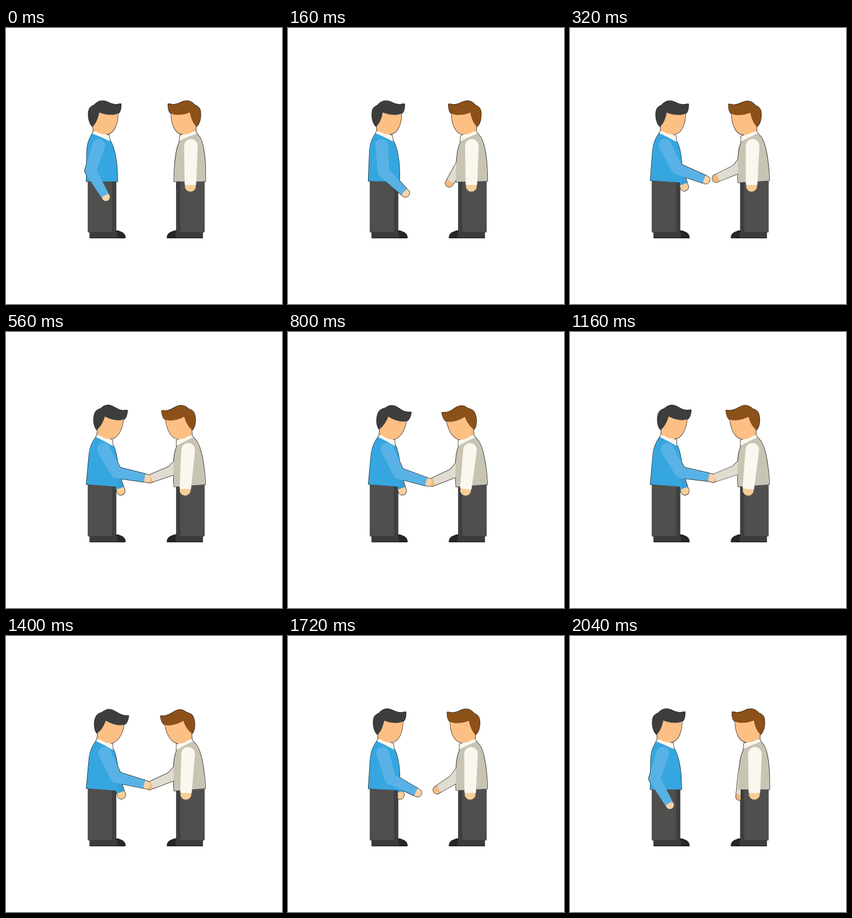
Recreate the animation shown at these times as an HTML page with a canvas. Size 500 px wide and 500 px high, loop 2.08 s.

```html
<!DOCTYPE html>
<html lang="en">
<head>
<meta charset="utf-8">
<title>Handshake</title>
<style>
  html, body { margin: 0; width: 100%; height: 100%; overflow: hidden; background: #fff; }
  canvas { display: block; }
</style>
</head>
<body>
<canvas id="stage" width="500" height="500"></canvas>
<script>
const ctx = document.getElementById('stage').getContext('2d');
const LOOP = 2080, STEP = 40, RAD = Math.PI / 180;
const HIP = [172, 278], NECK = [172, 178];

// Pose values at each key time; the first one closes the loop.
const TIMES = [0, 320, 480, 800, 1160, 1400, 1720, 2040];
const TRACKS = {
  lean:   [0, 3.6, 4.2, 4.5, 4.2, 4.4, 3, 0],
  nod:    [0, 0, 4, 11, 5.5, 9.5, 0, 0],
  upper:  [-18, 27.5, 30, 25.5, 30, 26, 17, -18],
  fore:   [30, 69, 80, 73, 80, 75.5, 62.5, 30],
  farX:   [186, 207, 208, 207, 208, 209, 203, 186],
  nearX:  [334, 329, 326, 322, 323, 326, 330, 334],
  elbowX: [316, 301, 299, 299, 299, 299, 300, 313],
  elbowY: [250, 256, 250.5, 256, 250.5, 255, 260, 250],
  wristX: [316, 268, 263, 264, 263, 263.5, 273, 308],
  wristY: [285, 271, 264, 271, 264, 270, 277, 287]
};

// Monotone cubic interpolation over the looping keys.
function sample(vals, t) {
  const n = TIMES.length;
  const time = i => TIMES[(i + n) % n] + Math.floor(i / n) * LOOP;
  const val = i => vals[(i + n) % n];
  const slope = i => (val(i + 1) - val(i)) / (time(i + 1) - time(i));
  const tangent = i => {
    const a = slope(i - 1), b = slope(i);
    return a * b <= 0 ? 0 : 2 * a * b / (a + b);
  };
  let i = n - 1;
  while (TIMES[i] > t) i--;
  const d = time(i + 1) - time(i), u = (t - time(i)) / d;
  const u2 = u * u, u3 = u2 * u;
  return (2 * u3 - 3 * u2 + 1) * val(i) + (u3 - 2 * u2 + u) * d * tangent(i)
       + (3 * u2 - 2 * u3) * val(i + 1) + (u3 - u2) * d * tangent(i + 1);
}

const SHAPES = {
  pants: 'M149 272H199V369.5H149Z',
  seam: 'M192 272H199V369.5H192Z',
  toe: 'M196 367.5H203C210 370 216 372 216 380.3H196Z',
  shoe: 'M152 368H198C201 370 203 376 200 380.3H152Z',
  neck: 'M158 174L178 180L179 194L174 196L158 189Z',
  collar: 'M159 187L172 189.5L187 194.5L188 205L172 197.5L156 191Z',
  face: 'M169 150L202.7 152C203.7 172 196.7 192.7 180 192.7C168 192.7 158.5 186 158.5 177Z',
  hair: 'M157 178.5C150.5 173 148 160 149.7 151C150.5 144.5 155 141.5 160 139.5C165 133.5 172 130.6 179 132.5' +
        'C187 134.5 192 139.5 201 138.5C204 137.5 206 137.5 208.4 137.5C208.4 142 209 149 204.5 153.7' +
        'C197 159.5 180 157.7 169 153C167 163 164 172 157 178.5Z',
  sweater: 'M157 190L187 201C197 215 202 240 202 278H145.5L146.2 232C146 212 149 203 157 190Z',
  vest: 'M163 190L192 204C198 211 203 235 203.7 278H146.5C146 250 148 215 156 199Z'
};
for (const k in SHAPES) SHAPES[k] = new Path2D(SHAPES[k]);

const BLUE_MAN = { top: SHAPES.sweater, cloth: '#36a6e0', hair: '#3d3d3e', shift: 0 };
const VEST_MAN = { top: SHAPES.vest, cloth: '#c8c4b3', hair: '#8c5118', shift: 6 };

let parts = [];
function add(path, color, edge = true) {
  parts.push({ path, color, edge, m: ctx.getTransform() });
}

// Tapered limb: round at a, round or flat at b.
function limb(a, b, ra, rb, color, flat) {
  const q = Math.PI / 2, ang = Math.atan2(b[1] - a[1], b[0] - a[0]);
  const nx = -Math.sin(ang) * rb, ny = Math.cos(ang) * rb;
  const p = new Path2D();
  p.arc(a[0], a[1], ra, ang + q, ang + 3 * q);
  if (flat) {
    p.lineTo(b[0] - nx, b[1] - ny);
    p.lineTo(b[0] + nx, b[1] + ny);
  } else {
    p.arc(b[0], b[1], rb, ang - q, ang + q);
  }
  p.closePath();
  add(p, color);
}

function sleeve(a, b, ra, rb, color, skin, reach, rh) {
  const d = Math.hypot(b[0] - a[0], b[1] - a[1]);
  const tip = [b[0] + (b[0] - a[0]) / d * reach, b[1] + (b[1] - a[1]) / d * reach];
  limb(b, tip, rh * 0.9, rh, skin);
  limb(a, b, ra, rb, color, true);
}

const along = (p, deg, len) =>
  [p[0] + Math.sin(deg * RAD) * len, p[1] + Math.cos(deg * RAD) * len];

function turn(pivot, deg) {
  ctx.translate(pivot[0], pivot[1]);
  ctx.rotate(deg * RAD);
  ctx.translate(-pivot[0], -pivot[1]);
}

function body(man, pose) {
  add(SHAPES.toe, '#262627');
  add(SHAPES.shoe, '#3b3b3c');
  add(SHAPES.pants, '#4f504e');
  add(SHAPES.seam, '#3e3f3f', false);
  ctx.save();
  turn(HIP, pose.lean);
  ctx.save();
  ctx.translate(man.shift, 0);
  add(SHAPES.neck, '#f3b579');
  ctx.restore();
  add(man.top, man.cloth);
  ctx.translate(man.shift, 0);
  add(SHAPES.collar, '#fbf7ef');
  turn(NECK, pose.nod - pose.lean);
  add(SHAPES.face, '#fcbf84');
  add(SHAPES.hair, man.hair);
  ctx.restore();
}

function vestMan(pose, sway) {
  const elbow = [pose.elbowX, pose.elbowY];
  limb([326, 226], elbow, 9.2, 8.5, '#e1dccf');
  sleeve(elbow, [pose.wristX, pose.wristY], 8.5, 7.1, '#e1dccf', '#eebb80', 3.5, 7.2);
  ctx.save();
  ctx.transform(-1, 0, 0, 1, 508, 0);
  body(VEST_MAN, pose);
  ctx.restore();
  sleeve([335 - sway, 213.5], [pose.nearX, 284.5], 12.3, 10.4, '#fbf7ef', '#f7cd97', 2, 10);
}

function blueMan(pose, sway) {
  sleeve([182, 216], [pose.farX - 1.5, 283], 9, 7.3, '#3a9dd8', '#f8ce98', 5, 7.5);
  body(BLUE_MAN, pose);
  const shoulder = [168 + sway + pose.nod * 0.6, 212.5];
  const elbow = along(shoulder, pose.upper, 48);
  const wrist = along(elbow, pose.fore, 52);
  const arm = '#59b2e5';
  limb(shoulder, elbow, 11.6, 10.3, arm);
  sleeve(elbow, wrist, 10.3, 7.5, arm, '#fdd2a5', 3.5, 7.3);
}

function draw(t) {
  const pose = {};
  for (const k in TRACKS) pose[k] = sample(TRACKS[k], t);
  const sway = 66 * Math.sin(pose.lean * RAD);

  parts = [];
  ctx.resetTransform();
  vestMan(pose, sway);
  blueMan(pose, sway);

  ctx.fillStyle = '#fff';
  ctx.fillRect(0, 0, 500, 500);
  ctx.lineJoin = 'round';
  ctx.lineWidth = 1.4;
  ctx.strokeStyle = '#141414';
  // Edges go under all fills, so only the silhouette keeps a line.
  for (const p of parts) {
    if (!p.edge) continue;
    ctx.setTransform(p.m);
    ctx.stroke(p.path);
  }
  for (const p of parts) {
    ctx.setTransform(p.m);
    ctx.fillStyle = p.color;
    ctx.fill(p.path);
  }
}

const start = performance.now();
function tick() {
  const t = (performance.now() - start) % LOOP;
  draw(Math.floor(t / STEP) * STEP);
  requestAnimationFrame(tick);
}
tick();
</script>
</body>
</html>
```
